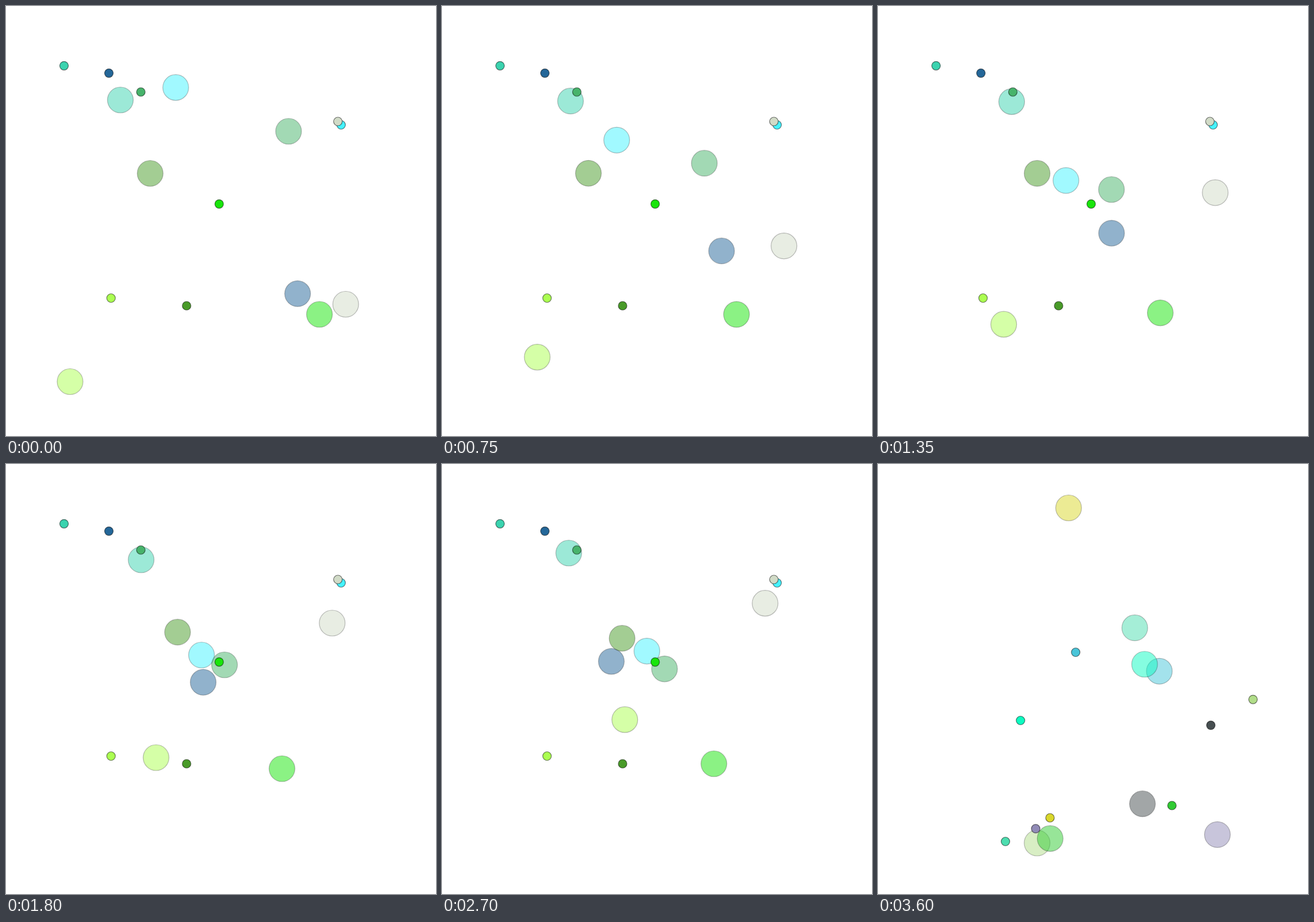
Recreate the animation shown at these times as an HTML page with a canvas. Size 700 by 700 pixels, loop 3.75 s.

```html
<!DOCTYPE html>
<html lang="en">
<head>
<meta charset="utf-8">
<title>Robots and goals</title>
<style>
  html, body { margin: 0; width: 100%; height: 100%; overflow: hidden; background: #fff; }
  canvas { display: block; width: 100%; height: 100%; }
</style>
</head>
<body>
<canvas id="stage" width="700" height="700"></canvas>
<script>
const ctx = document.getElementById('stage').getContext('2d');
const STEP = 150, STEPS = 25, LAST_RUN_STEP = 23;
const KNOTS = [0, 3, 7, 12, 16, 21, 23];

// Each robot: colour, goal, then its x and y at every knot (one value = standing still).
const firstRun = [
  ['#45f3ff', [545.5, 193.5], [276.3, 276.7, 296.5, 318.3, 328.5, 341.3, 347], [132.7, 180, 253.7, 311, 310, 290, 282]],
  ['#d1dbc7', [540.3, 188], [553, 556, 557, 531, 525, 529, 531], [485.5, 437.3, 343.3, 259, 234.7, 217, 212]],
  ['#246799', [167.5, 109.3], [474.7, 474, 420.7, 321, 283.5, 267.7, 264], [468.3, 421.5, 381.3, 355.3, 333.3, 303.5, 293]],
  ['#47b36b', [219.5, 140], [460, 446, 404.5, 355.7, 358, 371.5, 376], [204, 237, 274.7, 327, 334.3, 331.7, 331]],
  ['#3bd3af', [94.5, 97.3], [186.2, 201.7, 214.5, 220, 207.7, 205.3, 205], [153, 154, 155.3, 156, 148.3, 140.5, 138]],
  ['#499b29', [294, 488], [234.7, 234.7, 246, 279.3, 287.7, 301.7, 306], [272.5, 272.5, 272.2, 273.7, 284.3, 281.7, 280]],
  ['#abff51', [171, 475.5], [104.3, 133.5, 178.3, 244.3, 286.3, 310, 316], [611.5, 593.5, 545, 478, 432, 396.7, 386]],
  ['#19e50b', [347, 322.3], [510.3, 491.5, 468.7, 449.3, 443.7, 441.7, 441.5], [502, 502.5, 501.2, 496, 490.5, 485, 484]]
];
const nextRun = [
  ['#4dddaf', [207.5, 614.5], [418], [266.7]],
  ['#49c5d9', [321.8, 306.5], [458], [337.3]],
  ['#0dfbc1', [232, 417.5], [434], [326]],
  ['#d9d72b', [280, 576], [310.3], [71.5]],
  ['#474f51', [541.8, 425.3], [430.5], [553.2]],
  ['#918bb7', [256.7, 593.7], [552.5], [603.3]],
  ['#b1dd89', [610.5, 383.3], [259], [617]],
  ['#31cb33', [478.5, 556], [280.3], [609.7]]
];

// Monotone cubic curve through the knots: smooth, without overshoot.
function curve(values, time) {
  if (values.length === 1) return values[0];
  const slope = i => (values[i + 1] - values[i]) / (KNOTS[i + 1] - KNOTS[i]);
  const tangent = i => {
    if (i === 0) return slope(0);
    if (i === KNOTS.length - 1) return slope(i - 1);
    const a = slope(i - 1), b = slope(i);
    return a * b > 0 ? 2 * a * b / (a + b) : 0;
  };
  let i = 0;
  while (i < KNOTS.length - 2 && time >= KNOTS[i + 1]) i++;
  const span = KNOTS[i + 1] - KNOTS[i];
  const u = (time - KNOTS[i]) / span, v = 1 - u;
  return values[i] * v * v * (1 + 2 * u) + values[i + 1] * u * u * (3 - 2 * u)
    + span * u * v * (tangent(i) * v - tangent(i + 1) * u);
}

function disc(x, y, radius, colour, alpha) {
  ctx.globalAlpha = alpha;
  ctx.beginPath();
  ctx.arc(x, y, radius, 0, 2 * Math.PI);
  ctx.fillStyle = colour;
  ctx.fill();
  ctx.strokeStyle = 'rgba(0, 0, 0, 0.5)';
  ctx.lineWidth = 1.2;
  ctx.stroke();
}

function draw(now) {
  const step = Math.floor(now / STEP) % STEPS;
  const robots = step > LAST_RUN_STEP ? nextRun : firstRun;
  ctx.clearRect(0, 0, 700, 700);
  for (const [colour, , xs, ys] of robots) disc(curve(xs, step), curve(ys, step), 21, colour, 0.5);
  for (const [colour, [x, y]] of robots) disc(x, y, 7, colour, 1);
  requestAnimationFrame(() => draw(performance.now() - start));
}

const start = performance.now();
draw(0);
</script>
</body>
</html>
```
